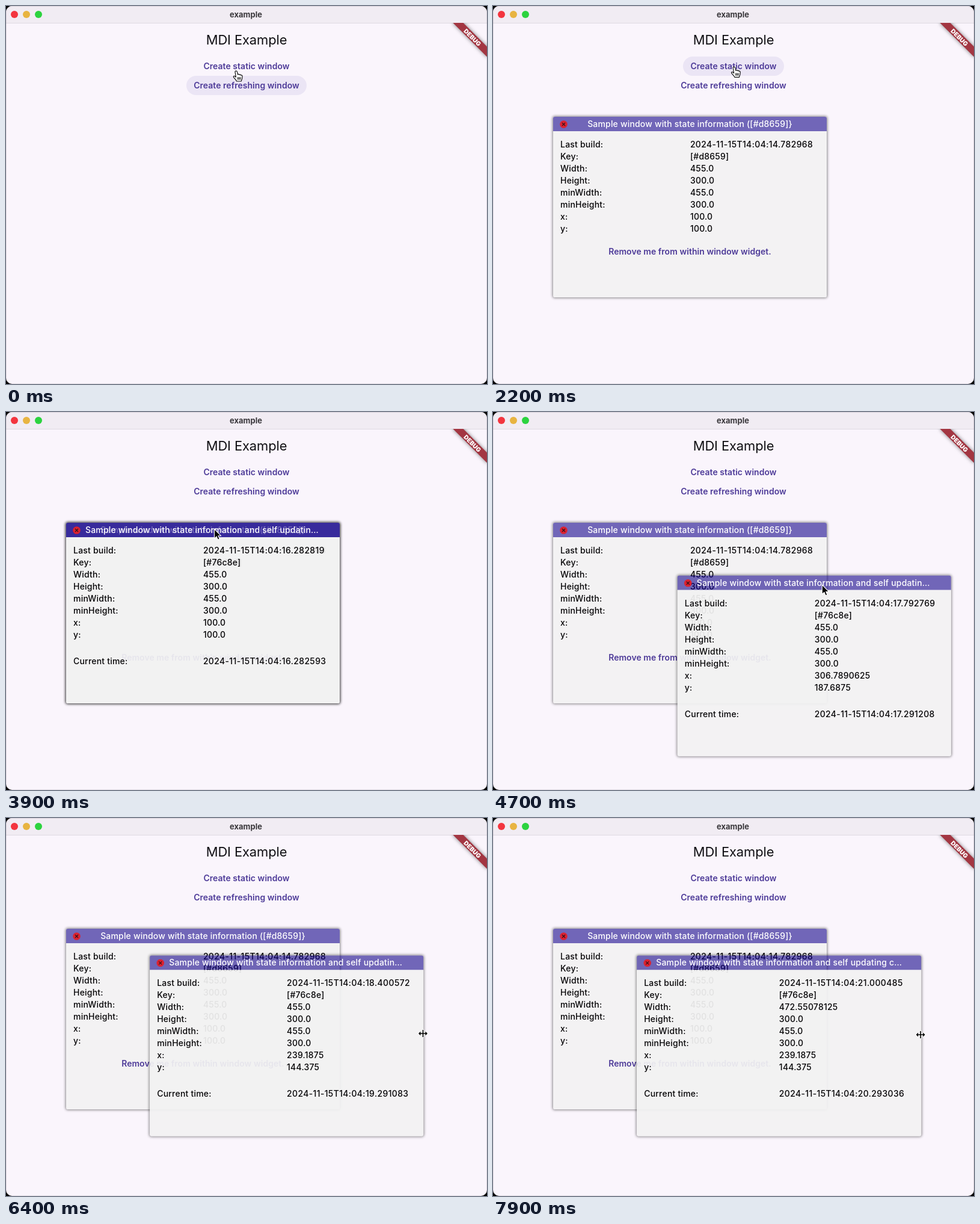
An HTML page that plays this animation: 800x628 px, repeating every 8000 ms.

```html
<!DOCTYPE html>
<html lang="en">
<head>
<meta charset="utf-8">
<title>MDI Example</title>
<style>
html, body { margin: 0; width: 100%; height: 100%; overflow: hidden; background: #000; }
#app { position: absolute; left: 0; top: 0; width: 800px; height: 628px; overflow: hidden;
  border-radius: 10px; background: #faf5fc; color: #060507;
  font: 450 14px/20px Inter, "Open Sans", sans-serif; letter-spacing: .21px; white-space: pre; }
#app * { position: absolute; box-sizing: border-box; }
#edge { inset: 0; border: 1px solid rgba(80, 70, 90, .16); border-radius: 10px; }
#bar { left: 0; top: 0; width: 800px; height: 29px; background: #f1ecf3; border-bottom: 1px solid #dfdae2; }
#bar b { left: 0; width: 798px; top: 4px; text-align: center; font-size: 13px; font-weight: 650;
  letter-spacing: 0; color: #39373b; }
.light { top: 8px; width: 12px; height: 12px; border-radius: 50%; }
#head { left: 0; width: 800px; top: 42px; text-align: center; font-size: 22px; font-weight: 400;
  line-height: 28px; letter-spacing: -.15px; color: #111014; }
.pill { height: 32px; border-radius: 16px; overflow: hidden; }
.pill .hover { inset: 0; background: #ebe5f5; }
.pill .ink { top: 16px; border-radius: 50%; background: #d8cce9; transform: translate(-50%, -50%); }
.link { color: #4d3a98; font-weight: 580; letter-spacing: .04px; text-align: center; }
.pill .link { left: 0; width: 100%; top: 6px; }
#corner { left: 640px; top: 28px; width: 160px; height: 160px; overflow: hidden; }
#ribbon { left: 120px; top: 28px; width: 80px; height: 12px; background: #a33642; color: #fff;
  transform: rotate(45deg); transform-origin: 40px -28px; box-shadow: 0 0 6px rgba(0, 0, 0, .5);
  font-size: 10.2px; font-weight: 900; line-height: 12px; letter-spacing: 0; text-align: center; }
.win { left: 0; top: 84px; height: 300px; border-radius: 3px; box-shadow: 0 0 4px 1px rgba(0, 0, 0, .48); }
.title { left: 0; top: 0; width: 100%; height: 24px; border-radius: 3px 3px 0 0;
  background: rgba(17, 0, 136, .58); }
.title span { top: 2px; color: #fff; letter-spacing: .17px; }
.body { left: 0; top: 24px; width: 100%; bottom: 0; border-radius: 0 0 3px 3px; background: rgba(243, 243, 243, .93); }
.stamp { letter-spacing: .35px; }
.close { left: 10.5px; top: 5.5px; }
#cursor { left: 0; top: 0; width: 1px; height: 1px; overflow: visible; }
</style>
</head>
<body>
<div id="app">
  <div id="bar">
    <i class="light" style="left:8px;background:#f3353f"></i>
    <i class="light" style="left:28px;background:#e8b441"></i>
    <i class="light" style="left:48px;background:#2cd33f"></i>
    <b>example</b>
  </div>
  <div id="head">MDI Example</div>
  <div id="corner"><div id="ribbon">DEBUG</div></div>
</div>
<script>
const app = document.getElementById('app');
const LOOP = 8000, STEP = 100;
const OPEN1 = 1700, OPEN2 = 3200, GRAB = 4000, DROP = 5300, RESIZE = 6700;
const DAY = '2024-11-15T14:04:';
const LONG_TITLE = 'Sample window with state information and self updating content ([#76c8e]}';

// Key points: time first, then the values reached at that time
const DRAG = [[GRAB, 100, 100], [4700, 306.7890625, 187.6875], [5100, 106.25, 54.375], [DROP, 239.1875, 144.375]];
const WIDTH = [[RESIZE, 455], [7200, 549.625], [7750, 458], [7900, 472.55078125]];
const ENTER = [[0, 383, 108], [600, 399.5, 98], [2000, 399.5, 98], [2900, 413.5, 124],
  [3300, 413.5, 124], [3900, 346.5, 194.5], [GRAB, 340.5, 199.5]];
const LEAVE = [[DROP, 479.7, 243.9], [5800, 703, 363], [6300, 693.5, 358]];
const BUILD = [[OPEN2, 16.282819], [4700, 17.792769], [DROP, 18.400572], [7900, 21.000485]];
const TICK = [[0, 16.282593], [1, 17.291208], [3, 19.291083], [4, 20.293036]];

const clamp = v => Math.min(1, Math.max(0, v));
const linear = k => k;
const smooth = k => k * k * (3 - 2 * k);

function along(keys, t, ease = smooth) {
  const i = keys.findIndex((key, n) => n && (t <= key[0] || n === keys.length - 1));
  const [t0, ...from] = keys[i - 1], [t1, ...to] = keys[i];
  const k = ease(clamp((t - t0) / (t1 - t0)));
  return from.map((v, n) => v + (to[n] - v) * k);
}

function el(parent, cls, text = '', css = {}) {
  const e = document.createElement('div');
  e.className = cls;
  e.textContent = text;
  Object.assign(e.style, css);
  parent.append(e);
  return e;
}

function pill(text, x, y, w) {
  const box = el(app, 'pill', '', { left: x + 'px', top: y + 'px', width: w + 'px' });
  const hover = el(box, 'hover'), ink = el(box, 'ink');
  el(box, 'link', text);
  return (level, dt, inkX) => {
    hover.style.opacity = level;
    const on = dt > 0 && dt < 500;
    ink.style.display = on ? '' : 'none';
    if (!on) return;
    ink.style.left = inkX - x + 'px';
    ink.style.width = ink.style.height = dt * .6 + 'px';
    ink.style.opacity = clamp((500 - dt) / 250);
  };
}

const LABELS = ['Last build:', 'Key:', 'Width:', 'Height:', 'minWidth:', 'minHeight:', 'x:', 'y:'];

function makeWindow(extra) {
  const win = el(app, 'win');
  const title = el(win, 'title');
  title.innerHTML = '<svg class="close" width="13" height="13"><circle cx="6.5" cy="6.5" r="6.3" fill="#dc2230"/>' +
    '<path d="M4 4l5 5M9 4l-5 5" stroke="#33121c" stroke-width="1.3"/></svg><span></span>';
  const caption = title.querySelector('span');
  const body = el(win, 'body');
  const values = [...LABELS, ...extra].map((label, i) => {
    const top = (i < 8 ? 12 + i * 20 : 196) + 'px';
    el(body, '', label, { left: '12px', top });
    return el(body, i % 8 ? '' : 'stamp', '', { top });
  });
  return {
    win, body, caption,
    set(x, y, w, texts) {
      win.style.width = w + 'px';
      win.style.transform = `translate(${x}px, ${y}px)`;
      values.forEach((v, i) => {
        v.style.left = 12.4 + (w - 24) / 2 + 'px';
        v.textContent = texts[i];
      });
    }
  };
}

const snap = v => Math.round(v * 256) / 256;
const num = v => Number.isInteger(v) ? v.toFixed(1) : String(v);
const stamp = (keys, t) => DAY + along(keys, t, linear)[0].toFixed(6);
const info = (build, key, w, x, y) =>
  [build, key, num(w), '300.0', '455.0', '300.0', num(x), num(y)];

const still = pill('Create static window', 316, 84, 168);
const fresh = pill('Create refreshing window', 300, 116, 200);

const one = makeWindow([]);
one.caption.textContent = 'Sample window with state information ([#d8659]}';
Object.assign(one.caption.style, { left: 0, width: '100%', textAlign: 'center' });
el(one.body, 'link', 'Remove me from within window widget.', { left: 0, width: '100%', top: '190px' });
one.set(100, 100, 455, info(DAY + '14.782968', '[#d8659]', 455, 100, 100));

const two = makeWindow(['Current time:']);
two.caption.style.left = '32px';

app.insertAdjacentHTML('beforeend', `<svg id="cursor">
  <path fill="#fff" stroke="#111" stroke-width="1.2" stroke-linejoin="round" stroke-linecap="round"
    d="M-2 1.2C-2 -.6 1 -.6 1.4 1.2L2.6 6C3 4.8 5 5 5.2 6.4C5.8 5.4 7.6 5.8 7.8 7.2
      C8.6 6.4 10 7.2 10 8.6L9.6 12.6L8.2 17H.6C-.6 14.4 -2.8 12.6 -4.4 10.4C-5.4 8.8 -3.6 7.6 -2.2 8.8L-.6 10.2Z
      M2.6 10.5v3.4M4.7 10.5v3.4M6.8 10.5v3.4"/>
  <path fill="#000" stroke="#fff" stroke-width="1.1" stroke-linejoin="round"
    d="M0 0V15.6L3.6 12.3L6 17.8L8.7 16.6L6.4 11.3H11.2Z"/>
  <path fill="#000" stroke="#fff" stroke-width="1.8" paint-order="stroke" stroke-linejoin="round"
    d="M-7.5 0L-4 -3.4V-.8H-.8V-6H.8V-.8H4V-3.4L7.5 0L4 3.4V.8H.8V6H-.8V.8H-4V3.4Z"/>
</svg><div id="edge"></div>`);
const cursor = document.getElementById('cursor');
const shapes = [...cursor.children];

function pointer(t, x, y, w) {
  if (t <= GRAB) return along(ENTER, t);
  if (t <= DROP) return [x + 240.5, y + 99.5];
  if (t <= RESIZE) return along(LEAVE, t);
  return [x + w - .6, 358 + 2 * clamp((t - RESIZE) / 600)];
}

function draw(t) {
  const fade = from => clamp((t - from) / 200);
  still(fade(0) - fade(2200), t - 1500, 400);
  fresh(1 - fade(0) + fade(2200) - fade(3400), t - 3000, 416);

  one.win.style.display = t < OPEN1 ? 'none' : '';
  two.win.style.display = t < OPEN2 ? 'none' : '';

  const [x, y] = along(DRAG, t).map(snap), [w] = along(WIDTH, t).map(snap);
  const built = t <= GRAB ? OPEN2 : t <= RESIZE ? Math.min(t, DROP) : t;
  const tick = Math.floor((t - OPEN2) / 1000);
  two.set(x, y, w, [...info(stamp(BUILD, built), '[#76c8e]', w, x, y), stamp(TICK, tick)]);
  const fit = 53 + Math.floor((w - 455) / 5.8);
  two.caption.textContent = fit < LONG_TITLE.length
    ? LONG_TITLE.slice(0, fit).trimEnd() + '…' : LONG_TITLE;

  const [px, py] = pointer(t, x, y, w);
  cursor.style.transform = `translate(${px}px, ${py}px)`;
  const kind = t < 3500 ? 0 : t < 6000 ? 1 : 2;
  shapes.forEach((s, i) => s.setAttribute('visibility', i === kind ? 'visible' : 'hidden'));
}

const start = performance.now();
let last = -1;
function frame() {
  const t = Math.floor((performance.now() - start) % LOOP / STEP) * STEP;
  if (t !== last) draw(last = t);
  requestAnimationFrame(frame);
}
frame();
</script>
</body>
</html>
```
